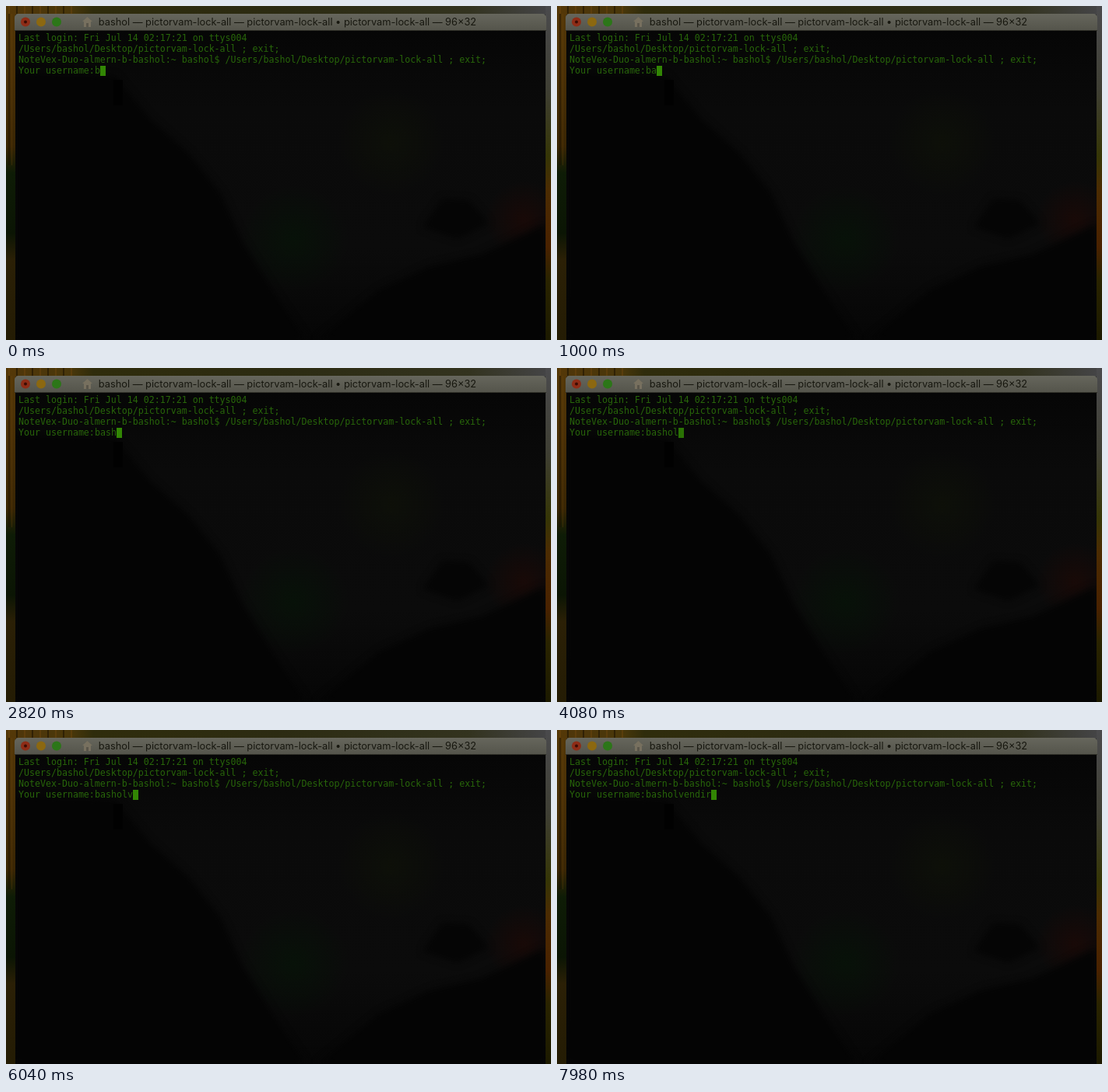
An HTML page with a canvas that plays this animation: 700 px wide and 430 px high, repeating every 8000 ms.

```html
<!DOCTYPE html>
<html lang="en">
<head>
<meta charset="utf-8">
<title>Terminal</title>
<style>
html, body { margin: 0; width: 100%; height: 100%; overflow: hidden; background: #000; }
canvas { display: block; }
</style>
</head>
<body>
<canvas id="stage" width="700" height="430"></canvas>
<script>
const W = 700, H = 430, LOOP = 8000;
const canvas = document.getElementById('stage');
const ctx = canvas.getContext('2d');

const USER = 'bashol';
const TOOL = 'pictorvam-lock-all';
const PATH = `/Users/${USER}/Desktop/${TOOL}`;
const TYPED = 'basholvendir';
const KEY_TIMES = [0, 420, 2000, 2700, 3200, 3700, 5260, 6060, 6400, 6860, 7260, 7720];
const LINES = [
  'Last login: Fri Jul 14 02:17:21 on ttys004',
  `${PATH} ; exit;`,
  `NoteVex-Duo-almern-b-${USER}:~ ${USER}$ ${PATH} ; exit;`
];
const PROMPT = 'Your username:';
const CELL = 7, LEFT = 16, BASE = 45, LEADING = 14;
const MONO = '11.627px "DejaVu Sans Mono", monospace';

function gradient(g, x0, y0, x1, y1, stops) {
  const fill = g.createLinearGradient(x0, y0, x1, y1);
  stops.forEach(([at, color]) => fill.addColorStop(at, color));
  return fill;
}

function rect(g, x, y, w, h, fill) {
  g.fillStyle = fill;
  g.fillRect(x, y, w, h);
}

function poly(g, points, fill) {
  g.fillStyle = fill;
  g.beginPath();
  points.forEach(([x, y]) => g.lineTo(x, y));
  g.fill();
}

function disc(g, x, y, r, fill) {
  g.fillStyle = fill;
  g.beginPath();
  g.arc(x, y, r, 0, Math.PI * 2);
  g.fill();
}

function glow(g, x, y, r, rgb, alpha) {
  const fill = g.createRadialGradient(x, y, 0, x, y, r);
  fill.addColorStop(0, `rgba(${rgb},${alpha})`);
  fill.addColorStop(1, `rgba(${rgb},0)`);
  rect(g, x - r, y - r, r * 2, r * 2, fill);
}

function drawDesktop(g) {
  rect(g, 0, 0, W, 11, gradient(g, 0, 0, W, 0, [
    [0, '#50360a'], [0.12, '#49370a'], [0.16, '#2f2c0c'],
    [0.5, '#2c2b12'], [0.85, '#33331f'], [1, '#454548']
  ]));
  rect(g, 0, 0, 12, H, gradient(g, 0, 0, 0, H, [
    [0, '#543808'], [0.2, '#4a3006'], [0.42, '#3a2604'], [0.5, '#0e1c06'],
    [0.68, '#0b1504'], [0.76, '#2b2006'], [1, '#241c04']
  ]));
  rect(g, 693, 0, 7, H, gradient(g, 0, 0, 0, H, [
    [0, '#4a4a4c'], [0.25, '#3f3f34'], [0.45, '#363606'], [0.55, '#4c2c02'],
    [0.72, '#4a2200'], [0.82, '#2a2400'], [1, '#1c1a00']
  ]));
  // bark streaks
  for (let i = 0; i < 9; i++) {
    const x = i * 10 + 3;
    rect(g, x, 0, 2, 10, i % 2 ? 'rgba(20,12,0,.5)' : 'rgba(120,76,16,.35)');
  }
  rect(g, 3, 10, 2, 195, 'rgba(20,12,0,.4)');
  rect(g, 7, 10, 1, 195, 'rgba(120,76,16,.3)');
}

function drawPane(g) {
  rect(g, 12, 32, 681, H - 32, gradient(g, 0, 32, 0, H, [
    [0, '#060606'], [0.25, '#0a0a0a'], [0.7, '#0b0b0b'], [1, '#060606']
  ]));
  glow(g, 495, 175, 70, '18,24,6', 0.4);
  glow(g, 370, 300, 70, '4,24,6', 0.5);
  glow(g, 665, 275, 50, '38,8,4', 0.5);
  g.filter = 'blur(5px)';
  poly(g, [[12, 85], [140, 90], [185, 145], [235, 190], [275, 240],
    [305, 305], [345, 370], [385, 430], [12, 430]], '#040404');
  poly(g, [[400, 430], [480, 365], [545, 335], [610, 320], [693, 280], [693, 430]], '#040404');
  poly(g, [[535, 285], [560, 248], [595, 250], [620, 280], [580, 300]], '#050505');
  g.filter = 'none';
  rect(g, 138, 95, 12, 33, '#010101');
}

function drawTitleBar(g) {
  g.fillStyle = gradient(g, 0, 10, 0, 32, [[0, '#66665c'], [1, '#54544b']]);
  g.beginPath();
  g.roundRect(11, 10, 683, 22, [5, 5, 0, 0]);
  g.fill();
  rect(g, 11, 31, 683, 1, '#303028');
  disc(g, 25, 20.5, 6, '#8e2c16');
  disc(g, 25, 20.5, 2, '#3a0c04');
  disc(g, 45, 20.5, 6, '#8c6810');
  disc(g, 65, 20.5, 6, '#2c7618');
  poly(g, [[98, 20], [104.5, 14], [111, 20], [109, 20], [109, 27], [100, 27], [100, 20]], '#77705f');
  rect(g, 103, 22, 3, 5, '#5a564a');
  g.fillStyle = '#17170f';
  g.font = '12.8px Inter, sans-serif';
  g.textAlign = 'center';
  g.fillText(`${USER} — ${TOOL} — ${TOOL} • ${TOOL} — 96×32`, 361.5, 25);
  g.textAlign = 'left';
}

function makeBackdrop() {
  const layer = document.createElement('canvas');
  layer.width = W;
  layer.height = H;
  const g = layer.getContext('2d');
  rect(g, 0, 0, W, H, '#000');
  drawDesktop(g);
  g.save();
  g.beginPath();
  g.rect(12, 32, 681, H - 32);
  g.clip();
  drawPane(g);
  g.restore();
  drawTitleBar(g);
  g.font = MONO;
  g.fillStyle = '#28660a';
  [...LINES, PROMPT].forEach((line, i) => g.fillText(line, LEFT, BASE + i * LEADING));
  return layer;
}

const backdrop = makeBackdrop();

function draw(t) {
  const count = KEY_TIMES.filter(key => key <= t).length;
  const x = LEFT + PROMPT.length * CELL;
  ctx.drawImage(backdrop, 0, 0);
  ctx.font = MONO;
  ctx.fillStyle = '#28660a';
  ctx.fillText(TYPED.slice(0, count), x, BASE + 3 * LEADING);
  const dim = t >= 4000 && t < 5700;
  rect(ctx, x + count * CELL, 77, CELL, 13, dim ? '#2a7204' : '#328604');
}

const start = performance.now();
function tick() {
  draw((performance.now() - start) % LOOP);
  requestAnimationFrame(tick);
}
tick();
</script>
</body>
</html>
```
